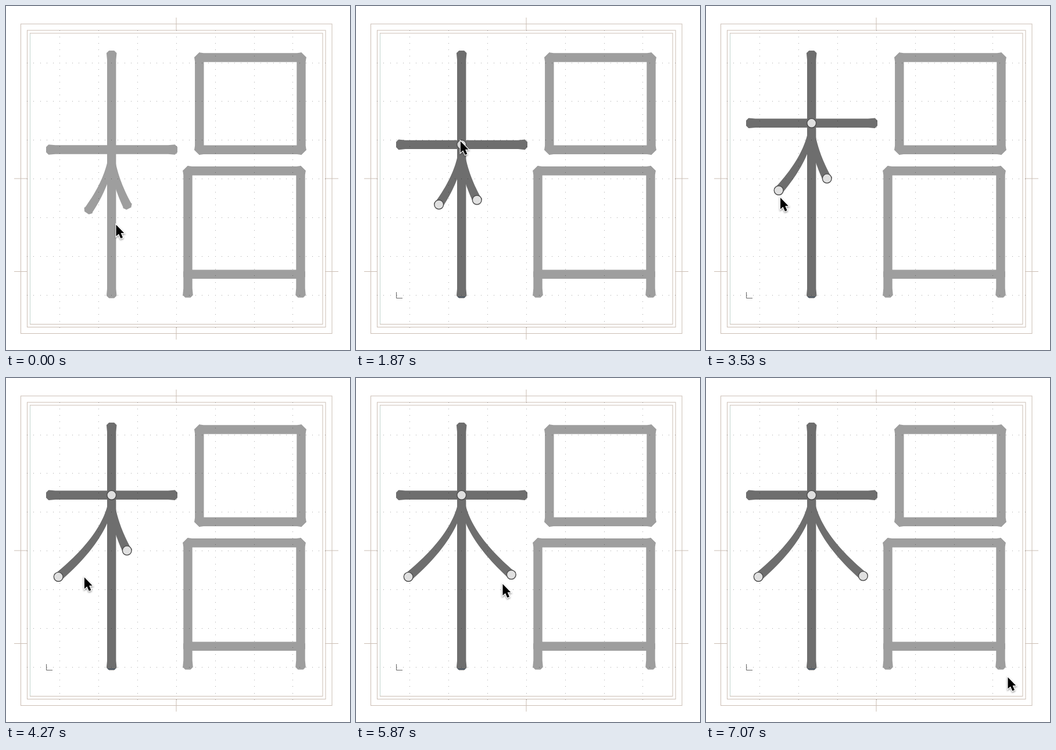
Animation, 592 px wide and 594 px high, one loop 7470 ms. Source, as an HTML page with a canvas:

```html
<!DOCTYPE html>
<html lang="en">
<head>
<meta charset="utf-8">
<title>Stroke editor</title>
<style>
html, body { margin: 0; width: 100%; height: 100%; overflow: hidden; background: #fff; }
canvas { display: block; }
</style>
</head>
<body>
<canvas id="stage" width="592" height="594"></canvas>
<script>
const ctx = document.getElementById('stage').getContext('2d');
const LOOP = 7470, STEP = 1000 / 15, SELECT_AT = 330;
const STEM_X = 181.7, TAN = '#cbbdb3';

// The three drags, each as [start ms, end ms]
const BAR_DRAG = [1620, 2267], LEFT_DRAG = [3213, 3867], RIGHT_DRAG = [4933, 5800];

// Pointer moves: when, and where to
const moves = [
  { when: [0, 133], to: [180.5, 374] },
  { when: [267, 1000], to: [170, 254] },
  { when: [1067, 1333], to: [178.5, 247] },
  { when: BAR_DRAG, to: [181, 203] },
  { when: [2600, 3133], to: [145, 303] },
  { when: LEFT_DRAG, to: [109, 359] },
  { when: [4000, 4800], to: [207, 299] },
  { when: RIGHT_DRAG, to: [252, 355] },
  { when: [6400, 7067], to: [519, 516] }
];

function ease(t, [start, end]) {
  const p = Math.min(1, Math.max(0, (t - start) / (end - start)));
  return p * p * (3 - 2 * p);
}

const mix = (a, b, p) => a.map((v, i) => v + (b[i] - v) * p);
const pointerAt = t => moves.reduce((pos, m) => mix(pos, m.to, ease(t, m.when)), [189, 377]);

function path(points) {
  ctx.beginPath();
  points.forEach(([x, y]) => ctx.lineTo(x, y));
}

function line(color, ...points) {
  ctx.strokeStyle = color;
  ctx.lineWidth = 1;
  path(points);
  ctx.stroke();
}

// Straight stroke with flared ends cut at 45 degrees; a tip is the half width left at the end
function straight(x1, y1, x2, y2, tip1 = 4.5, tip2 = 4.5) {
  const half = 7.7, flare = 8.8;
  const len = Math.hypot(x2 - x1, y2 - y1), ux = (x2 - x1) / len, uy = (y2 - y1) / len;
  const at = (d, h) => [x1 + ux * d - uy * h, y1 + uy * d + ux * h];
  const side = [[0, tip1], [flare - tip1, flare], [16, half],
                [len - 16, half], [len - flare + tip2, flare], [len, tip2]];
  path([...side.map(([d, h]) => at(d, h)), ...side.reverse().map(([d, h]) => at(d, -h))]);
  ctx.fill();
}

// Curved stroke, thin at the crossing and widening towards its capped end
function branch(x, y, dx, dy) {
  const cx = dx * .04, cy = dy * .47, left = [], right = [];
  let px, py, ux, uy;
  const add = (d, h) => {
    left.push([px + ux * d - uy * h, py + uy * d + ux * h]);
    right.unshift([px + ux * d + uy * h, py + uy * d - ux * h]);
  };
  for (let t = 0; t <= 1; t += 1 / 32) {
    const vx = cx * (1 - 2 * t) + dx * t, vy = cy * (1 - 2 * t) + dy * t, v = Math.hypot(vx, vy);
    px = x + 2 * t * (1 - t) * cx + t * t * dx;
    py = y + 2 * t * (1 - t) * cy + t * t * dy;
    ux = vx / v;
    uy = vy / v;
    add(0, 4 + 3.7 * t);
  }
  add(2, 8.5);
  add(7, 4.5);
  path([...left, ...right]);
  ctx.fill();
}

function rightPart() {
  ctx.fillStyle = '#9e9e9e';
  for (const y of [89, 248.3]) straight(324, y, 517, y, 0, 0);
  for (const x of [332.8, 508]) straight(x, 80, x, 257.3, 0, 0);
  straight(304, 284.7, 516, 284.7, 0, 0);
  for (const x of [313, 507]) straight(x, 275.8, x, 503.5, 0);
  straight(305, 463.2, 515, 463.2);
}

function frameLines() {
  ctx.lineWidth = 1;
  ctx.strokeStyle = TAN;
  ctx.strokeRect(25.5, 31, 535.5, 534.5);
  ctx.strokeRect(36.5, 42, 513.5, 512.5);
  ctx.strokeRect(41.5, 47, 503.5, 502.5);
  line('#c4d5d0', [41.5, 48], [41.5, 549]);
  for (const y of [20, 554]) line(TAN, [293, y], [293, y + 22]);
  for (const y of [298, 458.5])
    for (const x of [14, 549]) line(TAN, [x, y], [x + 23, y]);
}

function gridDots() {
  const cell = 66.9, gap = cell / 6;
  ctx.fillStyle = 'rgba(0,0,0,.36)';
  const dot = (i, j) => ctx.fillRect(Math.round(92 + i * gap), Math.round(97.5 + j * gap), 1, 1);
  for (let i = 0; i <= 36; i += 6)
    for (let j = -5; j <= 41; j++) {
      dot(j, i);
      if (j % 6 || j < 0) dot(i, j);
    }
}

function handle(x, y) {
  ctx.beginPath();
  ctx.arc(x, y, 7.9, 0, 7);
  ctx.fillStyle = '#e0e0e0';
  ctx.fill();
  ctx.strokeStyle = '#4c4c4c';
  ctx.lineWidth = 1.4;
  ctx.stroke();
}

function pointer(x, y) {
  ctx.save();
  ctx.translate(x + .5, y + .8);
  ctx.scale(.94, .94);
  path([[0, 0], [0, 21], [4.8, 16.7], [8.4, 25], [12.2, 23.4], [8.7, 15.2], [14.6, 15.2]]);
  ctx.closePath();
  ctx.lineWidth = 2.6;
  ctx.strokeStyle = '#fff';
  ctx.shadowColor = 'rgba(0,0,0,.45)';
  ctx.shadowBlur = 3;
  ctx.shadowOffsetY = 1.5;
  ctx.stroke();
  ctx.shadowColor = 'transparent';
  ctx.fillStyle = '#000';
  ctx.fill();
  ctx.restore();
}

function draw(now) {
  // Fifteen pictures a second; dragged parts lag one picture behind the pointer
  const t = Math.floor((now % LOOP + 4) / STEP) * STEP, lag = t - STEP;
  const selected = t + 4 >= SELECT_AT;
  const y = 248 - 45.7 * ease(lag, BAR_DRAG);
  const ends = [
    mix([-39, 103.5], [-91.5, 141], ease(lag, LEFT_DRAG)),
    mix([26.5, 95.5], [88.7, 139.5],
        .95 * ease(lag, RIGHT_DRAG) + .05 * ease(t, [6067, 6267]))
  ];

  ctx.fillStyle = '#fff';
  ctx.fillRect(0, 0, 592, 594);
  frameLines();
  rightPart();
  ctx.fillStyle = selected ? '#6e6e6e' : '#9e9e9e';
  straight(69, y, 295, y);
  straight(STEM_X, 77, STEM_X, 504.5);
  for (const [dx, dy] of ends) branch(STEM_X, y, dx, dy);
  gridDots();
  if (selected) {
    line('#666', [69.5, 494], [69.5, 504.5], [80, 504.5]);
    line('#34495e', [175, 502.5], [188, 502.5]);
    handle(STEM_X, y);
    for (const [dx, dy] of ends) handle(STEM_X + dx, y + dy);
  }
  pointer(...pointerAt(t));
}

const began = performance.now();
(function tick() {
  draw(performance.now() - began);
  requestAnimationFrame(tick);
})();
</script>
</body>
</html>
```
